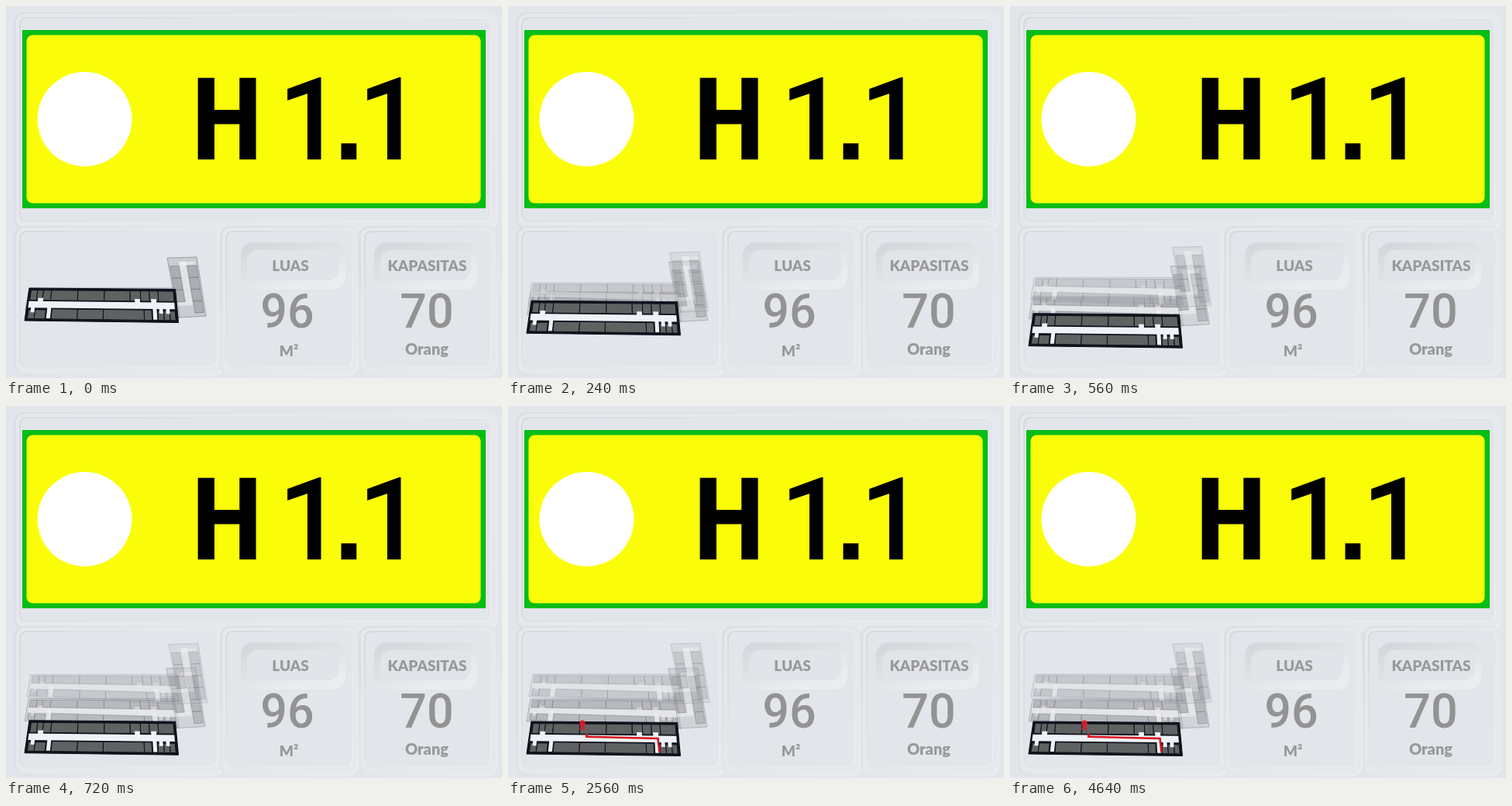
These frames come from a looping animation (640x480 px, 5120 ms). An HTML page with a canvas:

```html
<!DOCTYPE html>
<html lang="id">
<head>
<meta charset="utf-8">
<title>H 1.1</title>
<style>
  html, body { margin: 0; width: 100%; height: 100%; overflow: hidden; background: #e2e5ea; }
  canvas { display: block; width: 640px; height: 480px; }
</style>
</head>
<body>
<canvas id="stage" width="640" height="480"></canvas>
<script>
const LOOP = 5120, STEP = 40;
const view = document.getElementById('stage').getContext('2d');
const backdrop = document.createElement('canvas');
backdrop.width = 640;
backdrop.height = 480;
let g = backdrop.getContext('2d');

const clamp = v => Math.max(0, Math.min(1, v));

function box(x0, y0, x1, y1, r, fill) {
  g.beginPath();
  g.roundRect(x0, y0, x1 - x0, y1 - y0, r);
  g.fillStyle = fill;
  g.fill();
}

function slope(x0, y0, x1, y1, from, to) {
  const s = g.createLinearGradient(x0, y0, x1, y1);
  s.addColorStop(0, from);
  s.addColorStop(1, to);
  return s;
}

// Raised rim around a flat face
function panel(x0, y0, x1, y1) {
  box(x0 - 8, y0 - 7, x1 + 9, y1 + 13, 14, slope(x0, y0, x1, y1, '#dbdde2', '#eaecf0'));
  box(x0 - 5, y0 - 5, x1 + 7, y1 + 9, 12, '#e6e8ec');
  box(x0 - 1, y0 - 1, x1 + 1, y1 + 1, 9, slope(x0, y0, x1, y1, '#d6d9de', '#eff1f4'));
  box(x0 + 1, y0 + 1, x1, y1, 8, '#e2e5ea');
}

function pill(x0, x1) {
  box(x0, 305, x1, 366, 16, slope(x0 + 40, 305, x0 + 60, 366, '#d6d8dd', '#eaecef'));
  box(x0 + 8, 315, x1 - 8, 354, 14, '#e1e4e8');
}

function centred(text, x, y, font, color) {
  g.font = font;
  g.textAlign = 'center';
  g.fillStyle = color;
  g.fillText(text, x, y);
}

// Places the visible left edge of the glyph at x
function fromEdge(text, x, y, font) {
  g.font = font;
  g.textAlign = 'left';
  g.fillText(text, x + g.measureText(text).actualBoundingBoxLeft, y);
}

function paintBackdrop() {
  g.fillStyle = '#e2e5ea';
  g.fillRect(0, 0, 640, 480);
  panel(18, 15, 625, 277);
  panel(18, 291, 272, 465);
  panel(284, 291, 446, 465);
  panel(463, 291, 625, 465);

  box(21, 31, 619, 261, 0, '#05bd16');
  box(26.5, 37.5, 612.5, 254.5, 8, '#fbfd08');
  g.beginPath();
  g.arc(101.5, 146, 61, 0, 2 * Math.PI);
  g.fillStyle = '#fff';
  g.fill();

  g.fillStyle = '#000';
  const digit = '500 148px Roboto, sans-serif';
  fromEdge('H', 247, 198, 'bold 147px "Noto Sans Mono", monospace');
  fromEdge('1', 363, 198, digit);
  fromEdge('.', 432, 198, 'bold 140px "Liberation Sans", sans-serif');
  fromEdge('1', 466, 198, digit);

  pill(303, 438);
  pill(475, 608);
  const label = '900 19px Lato, sans-serif', number = '500 61px Roboto, sans-serif';
  centred('LUAS', 367, 342, label, '#999');
  centred('KAPASITAS', 543.5, 342, label, '#999');
  centred('96', 363, 414.5, number, '#939393');
  centred('70', 543, 414.5, number, '#939393');
  centred('M²', 365, 452, label, '#999');
  centred('Orang', 543, 450, '900 20px Lato, sans-serif', '#999');
}

// Bilinear map of the unit square onto corners TL, TR, BR, BL
const mapper = (tl, tr, br, bl) => (u, v) => [0, 1].map(i =>
  (1 - v) * (tl[i] + u * (tr[i] - tl[i])) + v * (bl[i] + u * (br[i] - bl[i])));

const slab = mapper([30, 364], [218.5, 365.5], [222.5, 408.5], [24, 406]);
const upperSlab = mapper([30, 364], [219, 364], [224, 402], [25, 393]);
const wing = mapper([208, 325], [246, 324], [258, 400], [222, 402]);

function patch(map, u0, v0, u1, v1, fill, line) {
  g.beginPath();
  [[u0, v0], [u1, v0], [u1, v1], [u0, v1]].forEach(p => g.lineTo(...map(...p)));
  g.closePath();
  g.fillStyle = fill;
  g.fill();
  if (line) {
    g.strokeStyle = line;
    g.lineWidth = 1;
    g.stroke();
  }
}

const BACK_ROOMS = [0.015, 0.06, 0.1, 0.155, 0.335, 0.515, 0.69, 0.76, 0.82, 0.88, 0.985];
const FRONT_ROOMS = [0.17, 0.34, 0.51, 0.78, 0.83];

function rooms(map, edges, v0, v1, c) {
  for (let i = 1; i < edges.length; i++)
    patch(map, edges[i - 1], v0, edges[i], v1, c.room, c.wall);
}

function floorPlan(map, c) {
  patch(map, 0, 0, 1, 1, c.base, c.wall);
  patch(map, 0.01, 0.4, 0.985, 0.6, c.hall);
  rooms(map, BACK_ROOMS, 0.06, 0.37, c);
  rooms(map, FRONT_ROOMS, 0.63, 0.94, c);
  rooms(map, [0.015, 0.06, 0.13], 0.66, 0.94, c);
  rooms(map, [0.87, 0.91, 0.95, 0.985], 0.66, 0.94, c);
  [0.138, 0.838].forEach(u => patch(map, u, 0.5, u + 0.026, 0.92, c.hall));
  [0.07, 0.72, 0.83].forEach(u => patch(map, u, 0.3, u + 0.035, 0.42, c.hall));
  [0.03, 0.88, 0.925].forEach(u => patch(map, u, 0.58, u + 0.025, 0.74, c.hall));
}

const GROUND = { base: '#11131d', room: '#606162', wall: '#0d0f19', hall: '#eef1f6' };
const GHOST = { base: '#b4b6bb', room: '#909196', wall: '#707278', hall: '#fff' };

function upperFloor(dx, dy, alpha) {
  g.save();
  g.translate(dx, dy);
  g.globalAlpha = alpha;
  floorPlan(upperSlab, GHOST);
  patch(wing, 0, 0, 1, 1, GHOST.base, GHOST.wall);
  for (let i = 0; i < 4; i++) {
    const v = 0.14 + i * 0.2;
    patch(wing, 0.63, v, 0.95, v + 0.2, GHOST.room, GHOST.wall);
    if (i < 3) patch(wing, 0.05, v, 0.34, v + 0.2, GHOST.room, GHOST.wall);
  }
  patch(wing, 0.38, 0.07, 0.6, 0.76, GHOST.hall);
  patch(wing, 0.38, 0.07, 0.9, 0.13, GHOST.hall);
  patch(wing, 0, 0.75, 0.6, 0.81, GHOST.hall);
  g.restore();
}

function groundFloor(dy) {
  g.save();
  g.translate(0, dy);
  floorPlan(slab, GROUND);
  g.restore();
}

const SPREAD = [[0, 0], [120, 0.25], [400, 0.55], [720, 0.97], [1120, 1]];

function spreadAt(t) {
  const i = SPREAD.findIndex(p => p[0] > t);
  if (i < 0) return 1;
  const [t0, a] = SPREAD[i - 1], [t1, b] = SPREAD[i];
  return a + (b - a) * (t - t0) / (t1 - t0);
}

function route(t) {
  const length = 110 * clamp((t - 1200) / 920);
  if (!length) return;
  const rise = Math.min(length, 18), run = length - rise;
  const tip = 193.5 - run;
  g.beginPath();
  g.moveTo(195.5, 447);
  g.lineTo(195.5 - rise / 9, 447 - rise);
  if (run) g.lineTo(tip, 429 - run / 40);
  const fade = t < 2120 ? 'rgba(224,28,36,0.2)' : '#d9151d';
  g.strokeStyle = slope(tip, 0, tip + 35, 0, fade, '#d9151d');
  g.lineWidth = 2.6;
  g.stroke();
  if (t >= 2120) box(100, 423, 103, 428, 0, '#d9151d');
}

function pin(t) {
  g.save();
  g.globalAlpha = clamp((t - 2400) / 160);
  g.fillStyle = g.strokeStyle = '#df1c27';
  g.beginPath();
  g.arc(96, 409, 3.6, 0, 2 * Math.PI);
  g.moveTo(93, 411);
  g.lineTo(99, 411);
  g.lineTo(96.5, 418);
  g.lineTo(95.5, 418);
  g.fill();
  g.beginPath();
  g.ellipse(96, 416.5, 3.6, 1.5, 0, 0, 2 * Math.PI);
  g.lineWidth = 1;
  g.stroke();
  box(95, 408, 97, 410, 1, '#6a3032');
  g.restore();
}

function draw(now) {
  const t = Math.floor((now % LOOP) / STEP) * STEP;
  const spread = spreadAt(t);
  g.drawImage(backdrop, 0, 0);
  upperFloor(-spread, 14 * spread, 0.4);
  upperFloor(2 * spread, -18 * spread, 0.25);
  groundFloor(43 * spread);
  route(t);
  pin(t);
}

paintBackdrop();
g = view;
const start = performance.now();
function tick() {
  draw(performance.now() - start);
  requestAnimationFrame(tick);
}
tick();
</script>
</body>
</html>
```
